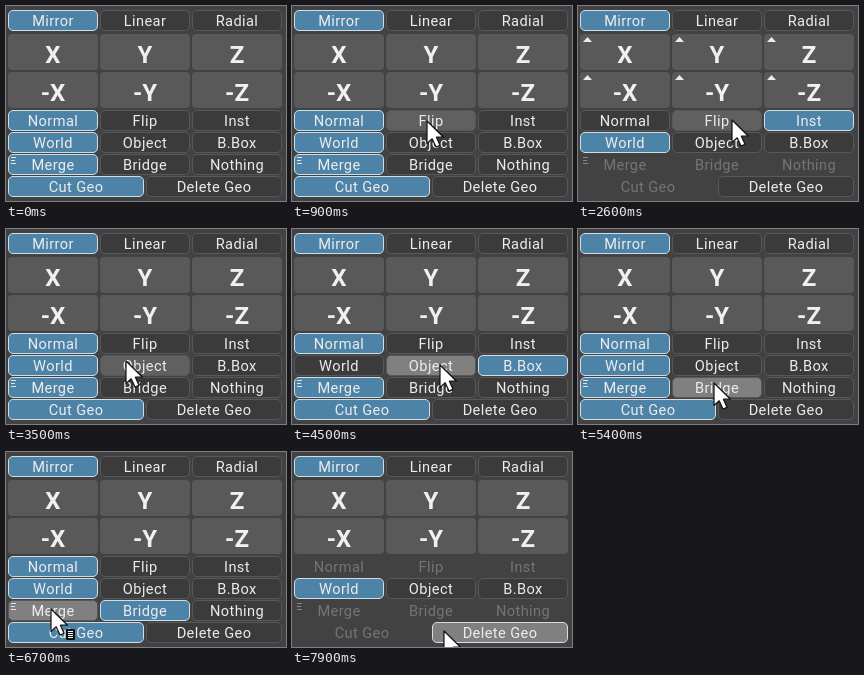
Recreate the animation shown at these times as an HTML page. Size 280 px wide and 195 px high, loop 8000 ms.

```html
<!DOCTYPE html>
<html lang="en">
<head>
<meta charset="utf-8">
<style>
  html, body { margin: 0; width: 100%; height: 100%; overflow: hidden; background: #424242; }
  svg { display: block; width: 280px; height: 195px; }
  text { font: 14.6px Roboto, sans-serif; letter-spacing: .4px; text-anchor: middle; }
  .big { font-size: 24px; font-weight: 700; letter-spacing: 0; fill: #f0f0f0; }
</style>
</head>
<body>
<svg id="stage" viewBox="0 0 280 195"></svg>
<script>
const LOOP = 8000, STEP = 100;
const stage = document.getElementById('stage');

function add(tag, attrs, parent = stage, label) {
  const node = document.createElementNS('http://www.w3.org/2000/svg', tag);
  set(node, attrs);
  if (label) node.textContent = label;
  parent.appendChild(node);
  return node;
}
function set(node, attrs) {
  for (const name in attrs) node.setAttribute(name, attrs[name]);
}

const rows = [
  [4, 'Mirror', 'Linear', 'Radial'],
  [104, 'Normal', 'Flip', 'Inst'],
  [126, 'World', 'Object', 'B.Box'],
  [148, 'Merge', 'Bridge', 'Nothing'],
  [170, 'Cut Geo', 'Delete Geo']
];
const MODE = 1, ORIENT = 2, JOIN = 3, GEO = 4;

// Pointer stops: time, x, y
const stops = [
  [200, 290, 152], [950, 133, 115], [1700, 132, 115],
  [2000, 222, 114], [2300, 222, 114], [3000, 48, 114], [3200, 48, 115],
  [3500, 120, 132], [3700, 126, 134], [4000, 196, 136], [4300, 196, 136],
  [4500, 148, 136], [4700, 148, 136], [4900, 72, 138], [5100, 72, 138],
  [5400, 136, 154], [5500, 137, 154], [5800, 222, 157], [6000, 222, 157],
  [6300, 138, 157], [6400, 138, 157], [6650, 45, 157], [6850, 45, 157],
  [7200, 152, 179], [8000, 152, 179]
];
// Clicks: press time, release time, row, column
const clicks = [
  [1100, 1200, MODE, 1], [2000, 2100, MODE, 2], [3100, 3200, MODE, 0],
  [3600, 3700, ORIENT, 1], [4000, 4100, ORIENT, 2], [4500, 4700, ORIENT, 1],
  [5000, 5100, ORIENT, 0], [5400, 5500, JOIN, 1], [5900, 6000, JOIN, 2],
  [6300, 6400, JOIN, 1], [6700, 6800, JOIN, 0], [7300, 7400, GEO, 1],
  [7900, 8100, GEO, 1]
];

// Axis buttons
const marks = add('g', { fill: '#ececec' });
['X', 'Y', 'Z', '-X', '-Y', '-Z'].forEach((axis, i) => {
  const x = 2 + i % 3 * 92, y = i < 3 ? 28 : 66;
  add('rect', { x, y, width: 90, height: 36, rx: 4, fill: '#595959' });
  add('text', { x: x + 45, y: y + 29, class: 'big' }, stage, axis);
  add('path', { d: `M${x + 3} ${y + 8}h9l-4.5-5z` }, marks);
});
stage.appendChild(marks);

const buttons = rows.flatMap(([y, ...labels], row) => labels.map((label, col) => {
  const w = labels.length === 2 ? 136 : 90;
  const x = 2 + col * (w + 2);
  const box = add('rect', { x: x + .5, y: y + .5, width: w - 1, height: 20, rx: 4.5 });
  const text = add('text', { x: x + w / 2, y: y + 16 }, stage, label);
  return { row, col, x, y, w, box, text };
}));

const grip = add('path', { d: 'M5 151.5h5M5 154.5h4M5 157.5h5', 'stroke-width': 1 });

const pointer = add('g', {});
add('path', {
  d: 'M0 0V22.5L5.2 17.8L9 26L13 24.2L9.4 16.2H16.5Z',
  fill: '#fff', stroke: '#111', 'stroke-width': 1.2, 'stroke-linejoin': 'round'
}, pointer);
const menuHint = add('g', {}, pointer);
add('rect', { x: 15, y: 20, width: 9, height: 11, rx: 1, fill: '#111' }, menuHint);
add('path', { d: 'M17 22.5h5M17 24.5h5M17 26.5h5M17 28.5h5', stroke: '#fff' }, menuHint);

function pointerAt(t) {
  const next = stops.findIndex(stop => stop[0] > t);
  if (next < 1) return next ? stops[stops.length - 1].slice(1) : stops[0].slice(1);
  const [t0, x0, y0] = stops[next - 1], [t1, x1, y1] = stops[next];
  const u = (t - t0) / (t1 - t0), k = u * u * (3 - 2 * u);
  return [x0 + (x1 - x0) * k, y0 + (y1 - y0) * k];
}

function paint(button, { chosen, disabled, hover, pressed }) {
  const fill = pressed ? '#808080'
    : chosen ? (hover ? '#568bb0' : '#4e83a8')
    : hover ? '#606060' : '#3b3b3b';
  set(button.box, {
    fill, stroke: chosen ? '#cfdde6' : '#585858',
    visibility: disabled ? 'hidden' : 'visible'
  });
  set(button.text, { fill: disabled ? '#757575' : '#ececec' });
}

function draw(t) {
  const [px, py] = pointerAt(t);
  const picked = [0, 0, 0, 0, 0];
  let held;
  for (const [press, release, row, col] of clicks) {
    if (t >= release) picked[row] = col;
    else if (t >= press) held = [row, col];
  }
  const copying = picked[MODE] > 0, deleting = picked[GEO] === 1;
  let overMerge = false;

  for (const b of buttons) {
    const { row, col } = b;
    const disabled = row === MODE && deleting
      || row === JOIN && (copying || deleting)
      || row === GEO && col === 0 && (copying || deleting);
    const hover = px >= b.x && px < b.x + b.w && py >= b.y && py < b.y + 21;
    if (hover && row === JOIN && col === 0) overMerge = true;
    paint(b, {
      disabled, hover,
      chosen: picked[row] === col,
      pressed: held && held[0] === row && held[1] === col
    });
  }
  const dim = copying || deleting;
  set(grip, { stroke: dim ? '#858585' : '#e4e4e4' });
  set(marks, { visibility: copying || picked[ORIENT] === 1 ? 'visible' : 'hidden' });
  set(menuHint, { visibility: overMerge ? 'visible' : 'hidden' });
  set(pointer, { transform: `translate(${Math.round(px)} ${Math.round(py)})` });
}

const start = performance.now();
function tick() {
  const t = (performance.now() - start) % LOOP;
  draw(Math.floor(t / STEP) * STEP);
  requestAnimationFrame(tick);
}
tick();
</script>
</body>
</html>
```
